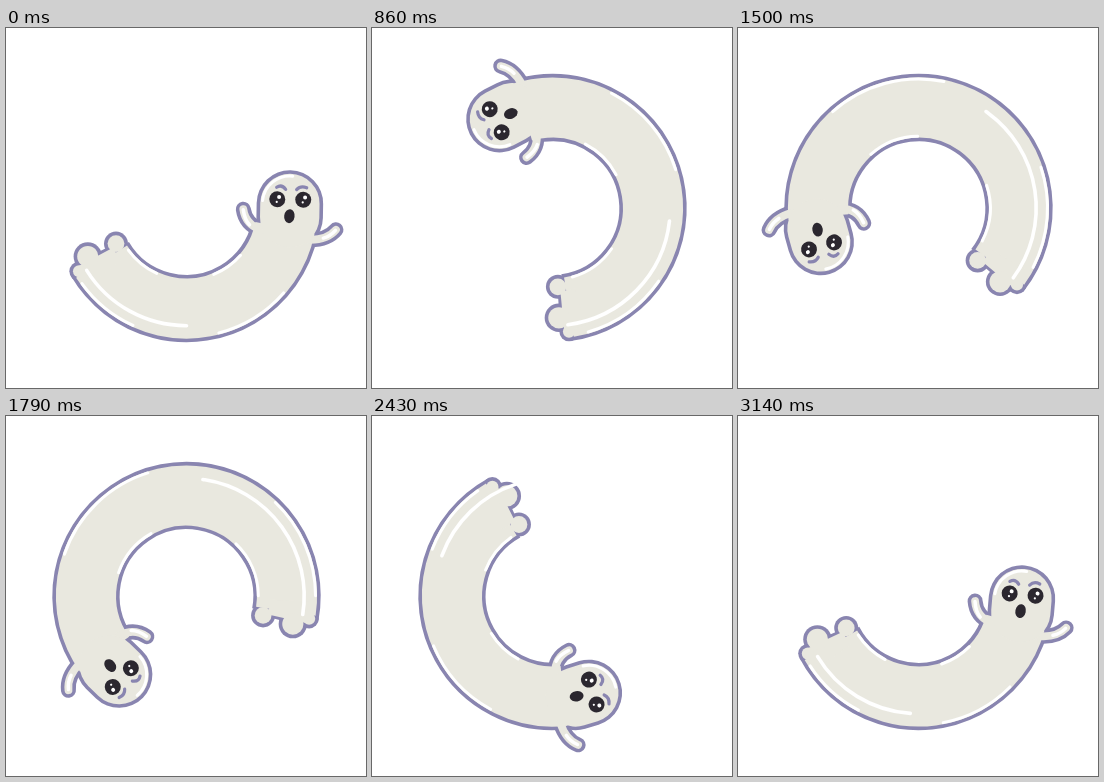
Write an HTML page with a canvas that moves like this. It is 360 by 360 pixels and loops after 3210 ms.

```html
<!DOCTYPE html>
<html lang="en">
<head>
<meta charset="utf-8">
<title>Ghost ring</title>
<style>
html, body { margin: 0; width: 100%; height: 100%; overflow: hidden; background: #fff; }
canvas { display: block; width: 360px; height: 360px; }
</style>
</head>
<body>
<canvas id="stage"></canvas>
<script>
const canvas = document.getElementById('stage');
const ctx = canvas.getContext('2d');
const scale = window.devicePixelRatio || 1;
canvas.width = canvas.height = 360 * scale;

const LOOP = 3210, STEPS = 45;
const CX = 180.5, CY = 180;
const LINE = '#8985b0', BODY = '#e9e8df', WHITE = '#fff', DARK = '#2b272f';
const EDGE = 3.6;

// Angles in degrees, counter-clockwise from the right, at chosen steps.
const KEY = [0, 6, 17, 25, 31, 38, 44];
const HEAD = [2.5, 62.3, 166.4, 229.4, 270.5, 317.3, 358.6];
const TAIL = [206.5, 240, 301.5, 345.5, 435, 520, 563.5];
const SHINE_START = [212, 245, 305, 351, 430, 515, 571];
const SHINE_END = [270, 312, 388, 442, 483, 573, 626];

// Smooth curve through the keys; each loop adds a full turn.
function track(values, step) {
  const n = KEY.length;
  const turn = i => Math.floor(i / n);
  const time = i => KEY[i - turn(i) * n] + turn(i) * STEPS;
  const value = i => values[i - turn(i) * n] + turn(i) * 360;
  const slope = i => (value(i + 1) - value(i)) / (time(i + 1) - time(i));
  const tangent = i => {
    const before = time(i) - time(i - 1), after = time(i + 1) - time(i);
    return (slope(i - 1) * after + slope(i) * before) / (before + after);
  };
  let i = 0;
  while (time(i + 1) <= step) i++;
  const h = time(i + 1) - time(i), u = (step - time(i)) / h;
  const v = 1 - u;
  return v * v * ((1 + 2 * u) * value(i) + u * h * tangent(i)) +
    u * u * ((3 - 2 * u) * value(i + 1) - v * h * tangent(i + 1));
}

const rad = deg => deg * Math.PI / 180;
const polar = (r, deg) => [CX + r * Math.cos(rad(deg)), CY - r * Math.sin(rad(deg))];

function stroke(color, width, cap = 'round') {
  ctx.strokeStyle = color;
  ctx.lineWidth = width;
  ctx.lineCap = cap;
  ctx.stroke();
}

function ringArc(r, from, to, color, width, cap) {
  ctx.beginPath();
  ctx.arc(CX, CY, r, -rad(from), -rad(to), true);
  stroke(color, width, cap);
}

function oval(x, y, rx, ry, color, tilt = 0) {
  ctx.beginPath();
  ctx.ellipse(x, y, rx, ry, tilt, 0, Math.PI * 2);
  ctx.fillStyle = color;
  ctx.fill();
}

function curve(x0, y0, x1, y1, x2, y2, color, width) {
  ctx.beginPath();
  ctx.moveTo(x0, y0);
  ctx.quadraticCurveTo(x1, y1, x2, y2);
  stroke(color, width);
}

function inHead(head, draw) {
  ctx.save();
  ctx.translate(...polar(103.5, head));
  ctx.rotate(-rad(head - 3.5));
  draw();
  ctx.restore();
}

function silhouette(head, tail, color, inset) {
  const end = tail + inset * 0.5;
  ringArc(100.5, end + 4, head - 14, color, 67.4 - 2 * inset, 'butt');
  // The middle of the tail reaches on into the three bumps.
  ringArc(103, end, tail + 12, color, 46 - 2 * inset, 'butt');
  for (const [r, offset, size] of [[79, 0.3, 12], [110, -0.3, 14.2], [124.7, 4, 9.7]]) {
    oval(...polar(r, tail + offset), size - inset, size - inset, color);
  }
  inHead(head, () => {
    const arm = 15 - 2 * inset;
    curve(-46.5, 6.5, -44, 22, -28, 27, color, arm);
    curve(46.5, 25.5, 38, 36, 20, 36, color, arm);
    ctx.beginPath();
    ctx.moveTo(0, 0);
    ctx.lineTo(0, 14);
    stroke(color, 66.5 - 2 * inset);
  });
}

function highlights(head, tail, step) {
  const span = head - tail;
  const edge = (r, a, b) => ringArc(r, tail + a * span, tail + b * span, WHITE, 3);
  edge(71.8, 0.06, 0.25);
  edge(71.8, 0.55, 0.72);
  edge(129, 0.06, 0.25);
  edge(129, 0.5, 0.72);
  ringArc(117.7, track(SHINE_START, step), track(SHINE_END, step), WHITE, 3.6);
}

function face() {
  ctx.beginPath();
  ctx.arc(0, 0, 27.5, rad(185), rad(275));
  stroke(WHITE, 3);
  curve(-46.5, 7, -45, 17, -40, 22, WHITE, 3.5);
  curve(46, 26, 41, 32, 34, 34, WHITE, 3.5);

  curve(-13.5, -16, -8.5, -19.5, -4.5, -14, LINE, 3.2);
  curve(6.5, -14, 10.5, -18.5, 16.5, -16, LINE, 3.2);
  for (const x of [-12.7, 13.3]) {
    oval(x, -4, 8, 8, DARK);
    oval(x + 1.8, -6.3, 2, 2, WHITE);
    oval(x - 0.5, -1.3, 1.1, 1.1, WHITE);
  }
  oval(-0.3, 12.7, 5.2, 7, DARK, 0.12);
}

function draw(now) {
  const step = Math.floor(((now + 5) % LOOP) / LOOP * STEPS);
  const head = track(HEAD, step);
  const tail = track(TAIL, step) - 360;
  ctx.setTransform(scale, 0, 0, scale, 0, 0);
  ctx.fillStyle = WHITE;
  ctx.fillRect(0, 0, 360, 360);
  silhouette(head, tail, LINE, 0);
  silhouette(head, tail, BODY, EDGE);
  highlights(head, tail, step);
  inHead(head, face);
}

const start = performance.now();
function frame() {
  draw(performance.now() - start);
  requestAnimationFrame(frame);
}
frame();
</script>
</body>
</html>
```
